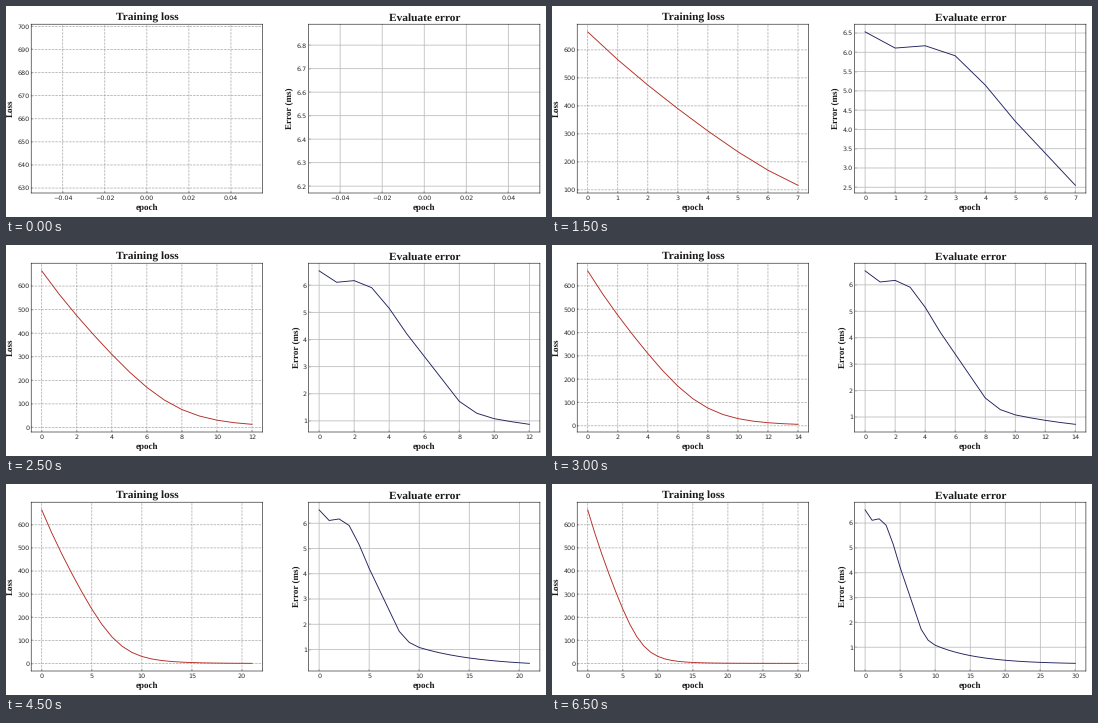
Write a matplotlib script that moves like this. It is 540 px wide and 211 px high and loops after 7000 ms.

```python
import math

import matplotlib.pyplot as plt
import numpy as np
from matplotlib.animation import FuncAnimation

W, H, DPI = 540, 211, 50
PT = 72 / DPI  # points per pixel
FRAMES, STEP_MS, LAST_EPOCH = 14, 500, 30

plt.rcParams.update({
    "font.family": "DejaVu Sans",
    "text.hinting": "none",
    "path.snap": False,
    "axes.linewidth": 0.55 * PT,
    "axes.titlepad": 3.6 * PT,
    "lines.linewidth": 0.9 * PT,
    "axes.axisbelow": True,
})
for axis, pad in (("xtick", 2.6), ("ytick", 1.6)):
    plt.rcParams.update({
        f"{axis}.direction": "in",
        f"{axis}.major.size": 2.0 * PT,
        f"{axis}.major.width": 0.4 * PT,
        f"{axis}.major.pad": pad * PT,
        f"{axis}.labelsize": 6.35 * PT,
        f"{axis}.color": "#777777",
        f"{axis}.labelcolor": "#2a2a2a",
    })

SERIF = dict(family="Liberation Serif", weight="bold", color="#1a1a1a")
DASHED = dict(color="#a0a0a0", lw=0.65 * PT, ls=(0, (3.7, 1.6)))
SOLID = dict(color="#bcbcbc", lw=0.8 * PT, ls="-")


def loss_at(epoch):
    """Exponential decay whose rate rises smoothly around epoch 7."""
    rate = 0.15 + 0.2 / (1 + np.exp((7 - epoch) / 2.2))
    return 0.8 + 663.6 * np.exp(-rate * epoch)


def error_at(epoch):
    """Plateau and steep fall through key points, then a slow decay."""
    fall = np.interp(epoch, [0, 1, 2, 3, 4, 5, 8, 9, 10],
                     [6.53, 6.11, 6.17, 5.91, 5.15, 4.21, 1.72, 1.28, 1.08])
    tail = 0.32 + 0.76 * np.exp((10 - epoch) / 6.3)
    return np.where(epoch < 10, fall, tail)


def add_axes(fig, left):
    top, bottom, width = 18.2, 187, 231.3
    return fig.add_axes([left / W, 1 - bottom / H, width / W, (bottom - top) / H])


def draw_panel(ax, epochs, values, color, title, ylabel, grid):
    ax.clear()
    ax.plot(epochs, values, color=color)
    ax.grid(True, **grid)
    ax.set_title(title, fontsize=11.4 * PT, **SERIF)
    ax.set_xlabel("epoch", fontsize=9 * PT, labelpad=2.8 * PT, **SERIF)
    ax.set_ylabel(ylabel, fontsize=9 * PT, labelpad=2.4 * PT, **SERIF)


fig = plt.figure(figsize=(W / DPI, H / DPI), dpi=DPI, facecolor="white")
loss_ax = add_axes(fig, 25.2)
error_ax = add_axes(fig, 302.6)


def update(frame):
    last = math.ceil(LAST_EPOCH * frame / (FRAMES - 1))
    epochs = np.arange(last + 1)
    draw_panel(loss_ax, epochs, loss_at(epochs), "#b22a22",
               "Training loss", "Loss", DASHED)
    draw_panel(error_ax, epochs, error_at(epochs), "#1f1f5c",
               "Evaluate error", "Error (ms)", SOLID)
    return []


anim = FuncAnimation(fig, update, frames=FRAMES, interval=STEP_MS,
                     init_func=lambda: [], repeat=True, repeat_delay=0)
plt.show()
```
